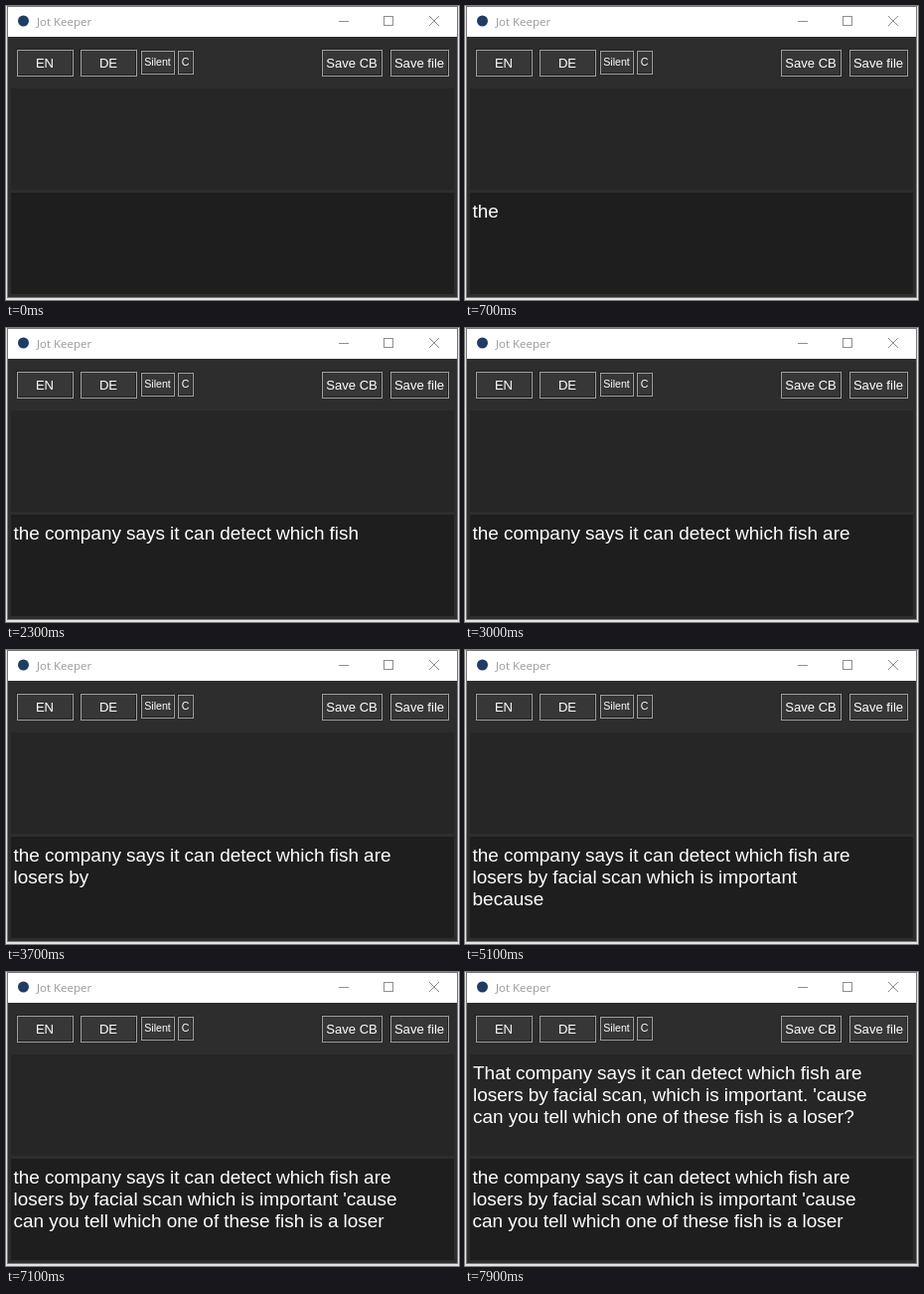
An HTML page for the animation above (8 s loop, 456 by 296 pixels).

```html
<!DOCTYPE html>
<html lang="en">
<head>
<meta charset="utf-8">
<title>Dictation window</title>
<style>
  html, body { margin: 0; width: 100%; height: 100%; overflow: hidden; background: #fff; }
  svg { display: block; width: 456px; height: 296px; }
  text { font-family: "Liberation Sans", Arial, sans-serif; fill: #fff; white-space: pre; }
  .title { font: 11.5px "Open Sans", "Noto Sans", sans-serif; fill: #999; }
  .speech { font-size: 19px; }
</style>
</head>
<body>
<svg id="stage" viewBox="0 0 456 296">
  <rect width="456" height="296" fill="#e4e4e4"/>
  <rect x="1" y="0" width="454" height="294" fill="#777"/>
  <rect x="2" y="1" width="452" height="30" fill="#fff"/>
  <rect x="2" y="31" width="452" height="262" fill="#2d2d2d"/>
  <rect x="5" y="83" width="446" height="102" fill="#262626"/>
  <rect x="5" y="188" width="446" height="102" fill="#1e1e1e"/>
  <circle cx="17.5" cy="15" r="5.5" fill="#1f3c63"/>
  <text class="title" x="31" y="20">Jot Keeper</text>
  <g fill="none" stroke="#8f8f8f">
    <path d="M335 15.5h10"/>
    <rect x="380.5" y="10.5" width="9" height="9"/>
    <path d="M426 10l10 10m0-10l-10 10"/>
  </g>
  <g id="buttons"></g>
  <g id="result"></g>
  <g id="live"></g>
</svg>
<script>
const LOOP = 8000;
const RESULT_AT = 7500;
const LINE_HEIGHT = 22;

const heard = [
  "the company says it can detect which fish are",
  "losers by facial scan which is important 'cause",
  "can you tell which one of these fish is a loser"
];
const firstGuess = [heard[0], "losers by facial scan which is important", "because"];
const corrected = [
  "That company says it can detect which fish are",
  "losers by facial scan, which is important. 'cause",
  "can you tell which one of these fish is a loser?"
];

// [time, number of words recognised]
const progress = [
  [600, 1], [800, 2], [1000, 4], [1200, 5], [1900, 6], [2100, 7], [2200, 8],
  [2600, 9], [3200, 10], [3500, 11], [4000, 12], [4200, 13], [4500, 15],
  [4700, 16], [4900, 17], [5300, 18], [5500, 20], [5700, 21], [5900, 22],
  [6100, 23], [6200, 24], [6500, 25], [6600, 26], [6800, 27], [7000, 28]
];
const CORRECTION_AT = 5300;

function add(parent, tag, attrs, content = "") {
  const node = document.createElementNS("http://www.w3.org/2000/svg", tag);
  for (const key in attrs) node.setAttribute(key, attrs[key]);
  node.textContent = content;
  return parent.appendChild(node);
}

// A button with a grooved border: a dark frame and a light one, one pixel apart.
function addButton(label, x, y, w, h, size) {
  const parent = document.getElementById("buttons");
  const frame = (offset, stroke) => add(parent, "rect", {
    x: x + offset + 0.5, y: y + offset + 0.5, width: w - 2, height: h - 2, fill: "none", stroke
  });
  add(parent, "rect", { x, y, width: w, height: h, fill: "#373737" });
  frame(0, "#212121");
  frame(1, "#a0a0a0");
  add(parent, "text", {
    x: x + w / 2, y: Math.round(y + h / 2 + size * 0.36),
    "font-size": size, "text-anchor": "middle"
  }, label);
}

addButton("EN", 10, 43, 58, 28, 13.1);
addButton("DE", 74, 43, 58, 28, 13.1);
addButton("Silent", 135, 44, 35, 25, 10.67);
addButton("C", 172, 44, 17, 25, 10.67);
addButton("Save CB", 317, 43, 62, 28, 13.1);
addButton("Save file", 386, 43, 60, 28, 13.1);

// Spaces take a whole number of pixels.
const pen = document.createElement("canvas").getContext("2d");
pen.font = '19px "Liberation Sans", Arial, sans-serif';
const spaceWidth = pen.measureText(" ").width;
const wordSpacing = Math.round(spaceWidth) - spaceWidth;

function addLines(id, x, y) {
  const parent = document.getElementById(id);
  return [0, 1, 2].map(i => add(parent, "text", {
    class: "speech", x, y: y + i * LINE_HEIGHT, "word-spacing": wordSpacing
  }));
}
const resultLines = addLines("result", 8, 108);
const liveLines = addLines("live", 7.5, 213);

function showWords(nodes, lines, count) {
  lines.forEach((line, i) => {
    const words = line.split(" ");
    nodes[i].textContent = words.slice(0, Math.max(0, count)).join(" ");
    count -= words.length;
  });
}

function render(t) {
  const reached = progress.filter(([time]) => time <= t).pop();
  const count = reached ? reached[1] : 0;
  showWords(liveLines, t < CORRECTION_AT ? firstGuess : heard, count);
  showWords(resultLines, corrected, t >= RESULT_AT ? Infinity : 0);
}

const start = performance.now();
function tick() {
  render((performance.now() - start) % LOOP);
  requestAnimationFrame(tick);
}
render(0);
requestAnimationFrame(tick);
</script>
</body>
</html>
```
